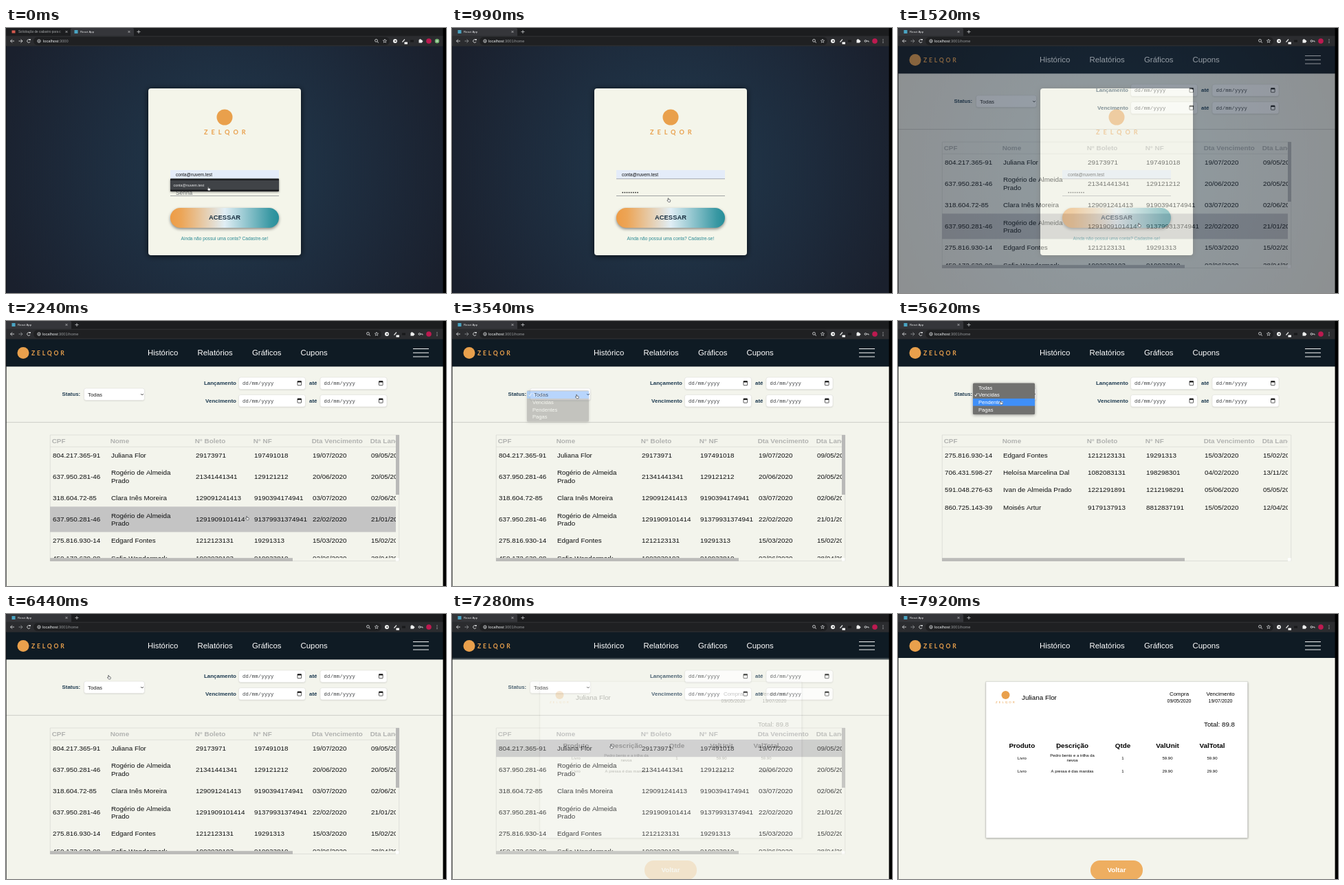
Recreate the animation shown at these times as an HTML page with a canvas. Size 640x386 px, loop 8000 ms.

```html
<!DOCTYPE html>
<html lang="pt">
<head>
<meta charset="utf-8">
<title>Painel de boletos</title>
<style>
html, body { margin: 0; width: 100%; height: 100%; overflow: hidden; background: #000; }
canvas { display: block; width: 640px; height: 386px; }
</style>
</head>
<body>
<canvas id="stage" width="640" height="386"></canvas>
<script>
const W = 640, H = 386, LOOP = 8000;
const SANS = '"Liberation Sans", Arial, sans-serif';
const MONO = '"Liberation Mono", monospace';
const CREAM = '#f3f4ec', ORANGE = '#e9a04c', NAVY = '#1d3a50';
const BRAND = 'ZELQOR', MAIL = 'conta@nuvem.test';

const stage = document.getElementById('stage').getContext('2d');
const layerCanvas = document.createElement('canvas');
layerCanvas.width = W;
layerCanvas.height = H;
const layer = layerCanvas.getContext('2d');
let g = stage;

const clamp = v => Math.max(0, Math.min(1, v));
const ramp = (t, a, b) => clamp((t - a) / (b - a));
const ease = p => p * p * (3 - 2 * p);

function rect(x, y, w, h, fill) {
  g.fillStyle = fill;
  g.fillRect(x, y, w, h);
}
function box(x, y, w, h, r, fill, stroke) {
  g.beginPath();
  g.roundRect(x, y, w, h, r);
  if (fill) { g.fillStyle = fill; g.fill(); }
  if (stroke) { g.strokeStyle = stroke; g.lineWidth = 0.7; g.stroke(); }
}
function dot(x, y, r, fill) {
  g.beginPath();
  g.arc(x, y, r, 0, 7);
  g.fillStyle = fill;
  g.fill();
}
function ring(x, y, r, color, from = 0, to = 7) {
  g.beginPath();
  g.arc(x, y, r, from, to);
  g.strokeStyle = color;
  g.lineWidth = 0.9;
  g.stroke();
}
function line(color, width, ...pts) {
  g.beginPath();
  for (let i = 0; i < pts.length; i += 2) g.lineTo(pts[i], pts[i + 1]);
  g.strokeStyle = color;
  g.lineWidth = width;
  g.stroke();
}
function text(s, x, y, size, color = '#0f1011', { align = 'left', bold = false, font = SANS, gap = 0 } = {}) {
  g.font = `${bold ? 'bold ' : ''}${size}px ${font}`;
  g.letterSpacing = gap + 'px';
  g.textAlign = align;
  g.fillStyle = color;
  g.fillText(s, x, y);
  g.letterSpacing = '0px';
}
function shadowed(color, blur, dy, draw) {
  g.shadowColor = color;
  g.shadowBlur = blur;
  g.shadowOffsetY = dy;
  draw();
  g.shadowColor = 'transparent';
  g.shadowBlur = g.shadowOffsetY = 0;
}
function clipped(x, y, w, h, draw) {
  g.save();
  g.beginPath();
  g.rect(x, y, w, h);
  g.clip();
  draw();
  g.restore();
}
// Draws a whole group with one opacity
function blend(alpha, draw) {
  if (alpha <= 0) return;
  g = layer;
  g.clearRect(0, 0, W, H);
  draw();
  g = stage;
  g.globalAlpha = alpha;
  g.drawImage(layerCanvas, 0, 0);
  g.globalAlpha = 1;
}
function brand(x, y, size, gap, bold = true) {
  text(BRAND, x, y, size, ORANGE, { font: 'Lato, sans-serif', gap, bold });
}

// Browser bar

function closeMark(x) {
  line('#c4c6c8', 0.7, x - 1.5, 4, x + 1.5, 7);
  line('#c4c6c8', 0.7, x + 1.5, 4, x - 1.5, 7);
}
function star(x, y) {
  g.beginPath();
  for (let i = 0; i < 10; i++) {
    const a = i * Math.PI / 5 - Math.PI / 2, r = i % 2 ? 1.2 : 2.8;
    g.lineTo(x + r * Math.cos(a), y + r * Math.sin(a));
  }
  g.closePath();
  g.strokeStyle = '#d0d2d4';
  g.lineWidth = 0.7;
  g.stroke();
}
function browser(home) {
  rect(0, 0, W, 12, '#1c1d1f');
  if (!home) {
    rect(8.5, 3.5, 5, 4, '#d65a4e');
    text('Solicitação de cadastro para c', 18, 7.2, 4.6, '#a9abad');
    closeMark(88);
  }
  const left = home ? 0 : 91;
  box(home ? 0 : 94, 0, home ? 95 : 92, 14, 2, '#35363a');
  rect(8.5 + left, 3, 5, 5, '#4aa5c4');
  text('React App', 17 + left, 7.2, 4.3, '#e6e7e8');
  closeMark(88 + left);
  const plus = home ? 103 : 193;
  line('#c4c6c8', 0.8, plus - 2.5, 5.5, plus + 2.5, 5.5);
  line('#c4c6c8', 0.8, plus, 3, plus, 8);
  rect(0, 11.5, W, 15, '#2b2c2f');
  box(40, 13, home ? 506 : 518, 12, 6, '#1f2022');

  const ink = '#d5d7d9', dim = '#8d9093';
  line(ink, 0.9, 12, 19, 6.5, 19);
  line(ink, 0.9, 9, 16.5, 6.5, 19, 9, 21.5);
  line(home ? dim : ink, 0.9, 18.5, 19, 24, 19);
  line(home ? dim : ink, 0.9, 21.5, 16.5, 24, 19, 21.5, 21.5);
  ring(33, 19, 2.3, ink, 0.4, 5.5);
  rect(33.8, 16, 2, 2, ink);
  ring(48, 19, 2.2, ink);
  rect(47.6, 18.2, 0.9, 2.2, ink);
  const x = home ? 53 : 54;
  text('localhost', x, 21, 5.7, '#eef0f1');
  text(home ? ':3001/home' : ':3000', x + g.measureText('localhost').width, 21, 5.7, '#96999c');

  const o = home ? -12 : 0;
  ring(538.5 + o, 18.3, 1.9, ink);
  line(ink, 0.9, 540 + o, 19.8, 542 + o, 21.6);
  star(551 + o, 19);
  dot(566 + o, 19, 3, '#f0f1f1');
  rect(565.5 + o, 18.2, 2, 1.6, '#333');
  line('#e4e5e6', 1.2, 576.5 + o, 20.5, 580 + o, 16.5);
  rect(579.5 + o, 20.5, 4.5, 3, '#fff');
  rect(588 + o, 17.5, 5, 3, '#18191b');
  rect(600.5 + o, 17.2, 4.6, 4.4, '#f0f1f1');
  dot(602.5 + o, 17, 1.1, '#f0f1f1');
  dot(605.3 + o, 19.4, 1.1, '#f0f1f1');
  if (home) {
    ring(601.5, 19, 1.4, ink);
    line(ink, 0.9, 603, 19, 606, 19, 606, 20.5);
    for (const y of [16.8, 19, 21.2]) dot(627, y, 0.6, ink);
  } else {
    dot(627, 19, 3.2, '#79b877');
    dot(627, 19, 1.1, '#e3f1e0');
  }
  dot(615, 19, 3.8, '#bd1a50');
}

// Login page

function login(t) {
  const bg = g.createRadialGradient(318, 206, 60, 318, 206, 350);
  bg.addColorStop(0, '#20364a');
  bg.addColorStop(0.55, '#1d2a3b');
  bg.addColorStop(1, '#1a202d');
  rect(0, 0, W, H, bg);
  shadowed('rgba(0,0,0,.75)', 9, 1, () => box(207, 88, 222, 243, 4, '#f4f5ea'));
  dot(318, 130, 11.5, ORANGE);
  brand(288, 154.5, 9.2, 4.9);

  rect(239, 207, 158, 13, '#e4ecf9');
  line('#8b8f92', 0.7, 239, 219.7, 397, 219.7);
  text(MAIL, 247, 215.6, 6.35);
  line('#8b8f92', 0.8, 239, 244.5, 397, 244.5);
  const typed = Math.floor(8 * ramp(t, 420, 950));
  if (typed) for (let i = 0; i < typed; i++) dot(248.3 + i * 3.1, 239.6, 0.9, '#222');
  else text('Senha', 247, 242.6, 8.4, '#6d7173');
  if (t < 300) {
    shadowed('rgba(0,0,0,.5)', 3, 1, () => box(239, 219.5, 158, 18.5, 1, '#1d1e21'));
    rect(239, 222, 158, 13.5, '#404347');
    text(MAIL, 243.5, 230.6, 5.35, '#e9eaeb');
  }

  const fill = g.createLinearGradient(239, 0, 397, 0);
  fill.addColorStop(0, '#ee9c45');
  fill.addColorStop(0.1, '#eca557');
  fill.addColorStop(0.5, '#e1eef5');
  fill.addColorStop(0.93, '#3797a2');
  fill.addColorStop(1, '#278f9a');
  shadowed('rgba(0,0,0,.45)', 4, 2, () => box(239, 262, 158, 29, 14.5, fill));
  text('ACESSAR', 318, 279.3, 9.4, '#1b3142', { align: 'center', bold: true });
  text('Ainda não possui uma conta? Cadastre-se!', 318, 308.8, 6.62, '#2b8a94', { align: 'center' });
}

// Home page

function row(cpf, name, bill, note, due, issued) {
  const lines = name.split('|');
  return { lines, cells: [cpf, null, bill, note, due, issued], h: lines.length > 1 ? 37 : 25.2 };
}
const flor = row('804.217.365-91', 'Juliana Flor', '29173971', '197491018', '19/07/2020', '09/05/2020');
const prado = row('637.950.281-46', 'Rogério de Almeida|Prado', '21341441341', '129121212', '20/06/2020', '20/05/2020');
const clara = row('318.604.72-85', 'Clara Inês Moreira', '129091241413', '9190394174941', '03/07/2020', '02/06/2020');
const prado2 = row('637.950.281-46', 'Rogério de Almeida|Prado', '1291909101414', '91379931374941', '22/02/2020', '21/01/2020');
const edgard = row('275.816.930-14', 'Edgard Fontes', '1212123131', '19291313', '15/03/2020', '15/02/2020');
const sofia = row('450.172.639-08', 'Sofia Wendermark', '1902039103', '919933810', '02/06/2020', '28/04/2020');
const helo = row('706.431.598-27', 'Heloísa Marcelina Dal', '1082083131', '198298301', '04/02/2020', '13/11/2019');
const ivan = row('591.048.276-63', 'Ivan de Almeida Prado', '1221291891', '1212198291', '05/06/2020', '05/05/2020');
const moises = row('860.725.143-39', 'Moisés Artur', '9179137913', '8812837191', '15/05/2020', '12/04/2020');

const LISTS = [
  [flor, prado, clara, prado2, edgard, sofia],
  [edgard, helo, ivan, moises],
  [flor, prado, clara]
];
const OPTIONS = ['Todas', 'Vencidas', 'Pendentes', 'Pagas'];
const HEADS = ['CPF', 'Nome', 'N° Boleto', 'N° NF', 'Dta Vencimento', 'Dta Lançamento'];
const COLS = [68, 153, 276, 361, 446, 531];

function nav(bottom) {
  rect(0, 26, W, bottom - 26, '#0f1b24');
  dot(25, 46.5, 8.5, ORANGE);
  brand(37, 49.8, 8.6, 2.8);
  text('Histórico', 206, 49.8, 11.4, '#fff');
  text('Relatórios', 278.5, 49.8, 11.4, '#fff');
  text('Gráficos', 358, 49.8, 11.4, '#fff');
  text('Cupons', 428.5, 49.8, 11.4, '#fff');
  for (const y of [40.5, 46.3, 52]) line('#f4f5f5', 1, 592, y, 615, y);
}
function field(x, y, w, h) {
  shadowed('rgba(0,0,0,.12)', 2, 1, () => box(x, y, w, h, 3, '#fff'));
  box(x, y, w, h, 3, null, '#e2e3de');
}
function dateField(x, y) {
  field(x, y, 97, 17.5);
  text('dd/mm/yyyy', x + 5.5, y + 11.1, 7.2, '#3b3e40', { font: MONO, gap: 0.25 });
  const ix = x + 85.5, iy = y + 5.5;
  box(ix, iy, 5.6, 6.2, 0.6, null, '#161616');
  rect(ix, iy, 5.6, 1.9, '#161616');
}
function filters(chosen) {
  const label = { bold: true };
  text('Status:', 81.5, 109.3, 7.9, NAVY, label);
  field(113.5, 98, 88, 17.5);
  text(OPTIONS[chosen], 119, 109.6, 7.9, '#222');
  line('#333', 0.9, 196.2, 106, 198, 107.9, 199.8, 106);
  [['Lançamento', 82], ['Vencimento', 107.5]].forEach(([name, y]) => {
    text(name, 335, y + 11.3, 8, NAVY, { bold: true, align: 'right' });
    dateField(338.5, y);
    text('até', 441, y + 11.3, 8, NAVY, label);
    dateField(457, y);
  });
  line('#c9cac5', 0.9, 0, 147.6, W, 147.6);
}
function table(rows, mouse) {
  box(64.3, 166, 507.4, 183.5, 0, null, '#d6d7d1');
  clipped(64, 166, 503, 179.3, () => {
    HEADS.forEach((h, i) => text(h, COLS[i] - 1.3, 178.2, 9.9, '#b1b2b0', { bold: true }));
    line('#dcddd7', 0.8, 64, 183.3, 567, 183.3);
    let y = 183;
    for (const r of rows) {
      if (mouse && mouse.y >= y && mouse.y < Math.min(y + r.h, 345) && mouse.x > 64 && mouse.x < 567)
        rect(64, y, 503, r.h, '#c4c4c4');
      const mid = y + r.h / 2 + 3.4;
      COLS.forEach((x, i) => {
        if (r.cells[i]) text(r.cells[i], x, mid, 9.9);
      });
      const top = mid - (r.lines.length - 1) * 5.7;
      r.lines.forEach((s, i) => text(s, COLS[1], top + i * 11.4, 9.85));
      y += r.h;
    }
  });
  if (rows.length > 5) rect(567, 166, 5, 87, '#b9b9b8');
  rect(64, 345.2, 353, 4.8, '#bbbbb9');
  rect(567, 345.2, 4.5, 4.5, '#fff');
}
function popup(selected, hover) {
  const step = 10.7, first = 107.6 - selected * step, top = first - 6.4;
  const check = first + selected * step;
  shadowed('rgba(0,0,0,.4)', 4, 1, () => box(109, top, 90, 45.4, 1.5, '#71716f'));
  rect(109, first + hover * step - step / 2, 90, step, '#3f8ff8');
  OPTIONS.forEach((s, i) => text(s, 117, first + i * step + 2.7, 7.6, '#fff'));
  line('#fff', 0.9, 111.6, check, 113, check + 2, 115.4, check - 2.4);
}

// Each opening of the list: shown from, picked at, selected before, picked option
const MENUS = [
  { from: 3510, pick: 4030, before: 0, after: 1 },
  { from: 5160, pick: 5740, before: 1, after: 2 },
  { from: 5960, pick: 6270, before: 2, after: 0 }
];
const FADE = 85;
const openMenu = t => MENUS.find(m => t >= m.from && t < m.pick + FADE);

function home(t, mouse) {
  rect(0, 26, W, H, CREAM);
  let chosen = 0, shown = 0;
  for (const m of MENUS) {
    if (t >= m.pick) chosen = m.after;
    if (t >= m.pick + FADE) shown = m.after;
  }
  nav(66.4);
  filters(chosen);
  table(LISTS[shown], openMenu(t) ? null : mouse);
  browser(true);
}
function menu(t, mouse) {
  const m = openMenu(t);
  if (!m) return;
  const alpha = ramp(t, m.from, m.from + FADE) * (1 - ramp(t, m.pick, m.pick + FADE));
  const over = Math.round((mouse.y - 107.6) / 10.7 + m.before);
  const hover = t > m.pick ? m.after : Math.max(0, Math.min(3, over));
  blend(alpha, () => popup(m.before, hover));
}

// Detail page

function detail() {
  rect(0, 26, W, H, CREAM);
  nav(64);
  shadowed('rgba(0,0,0,.4)', 2.5, 1, () => rect(128, 98.5, 380.5, 227.5, '#fff'));
  box(127.8, 98.3, 381, 228, 0, null, '#cfd0cb');
  dot(156.5, 118, 6, ORANGE);
  brand(142, 129.6, 4.3, 2.2, false);
  const mid = { align: 'center' };
  text('Juliana Flor', 180, 125.4, 9.85, '#000');
  text('Compra', 409, 118.6, 7.9, '#000', mid);
  text('Vencimento', 469, 118.6, 7.9, '#000', mid);
  text('09/05/2020', 409, 129.4, 7, '#000', mid);
  text('19/07/2020', 469, 129.4, 7, '#000', mid);
  text('Total: 89.8', 490, 164.4, 9.75, '#000', { align: 'right' });
  const xs = [180.3, 253.5, 327, 392, 457];
  ['Produto', 'Descrição', 'Qtde', 'ValUnit', 'ValTotal'].forEach((s, i) =>
    text(s, xs[i], 195.3, 9.85, '#000', { align: 'center', bold: true }));
  [[211.6, 'Pedro bento e a trilha da|nevoa', '59.90'], [231.4, 'A pressa é das marolas', '29.90']].forEach(([y, name, price]) => {
    const parts = name.split('|');
    parts.forEach((s, i) => text(s, xs[1], y + (i - (parts.length - 1) / 2) * 6.8, 5.9, '#000', mid));
    ['Livro', null, '1', price, price].forEach((s, i) => {
      if (s) text(s, xs[i], y, 6, '#000', mid);
    });
  });
  box(280, 359, 76, 28, 13.5, '#eeae60');
  text('Voltar', 318, 376, 9.8, '#fff', { align: 'center', bold: true });
  browser(true);
}

// Mouse

const PATH = [
  [0, 295, 234], [260, 295, 232], [900, 310, 245], [1300, 351, 287], [2450, 351, 287],
  [3250, 182, 110], [3620, 182, 110], [3900, 150, 118], [4300, 150, 118], [4850, 152, 109],
  [5250, 152, 109], [5480, 150, 119], [5850, 150, 119], [6000, 150, 108], [6180, 150, 92],
  [6600, 150, 92], [7080, 232, 193], [8000, 232, 193]
];
function mouseAt(t) {
  let i = 0;
  while (i < PATH.length - 2 && t >= PATH[i + 1][0]) i++;
  const [t0, x0, y0] = PATH[i], [t1, x1, y1] = PATH[i + 1];
  const p = ease(ramp(t, t0, t1));
  return { x: x0 + (x1 - x0) * p, y: y0 + (y1 - y0) * p };
}
function hand({ x, y }) {
  g.save();
  g.translate(x, y);
  g.scale(0.8, 0.8);
  g.beginPath();
  [-1.6, -3.2, -0.5, -3.2, -0.2, -0.8, 2.4, -0.3, 3, 1, 2.2, 3.6, -0.9, 3.6, -3.2, 0.6, -1.6, 0.6]
    .forEach((v, i, a) => { if (i % 2) g.lineTo(a[i - 1], v); });
  g.closePath();
  g.fillStyle = '#fff';
  g.fill();
  g.strokeStyle = '#45484a';
  g.lineWidth = 0.9;
  g.stroke();
  g.restore();
}
function beam({ x, y }) {
  line('#333', 0.8, x, y - 3.5, x, y + 3.5);
  line('#333', 0.7, x - 1.4, y - 3.8, x + 1.4, y - 3.8);
  line('#333', 0.7, x - 1.4, y + 3.8, x + 1.4, y + 3.8);
}

function draw(t) {
  const mouse = mouseAt(t);
  const toHome = ramp(t, 1410, 1620), toDetail = ramp(t, 7240, 7420);
  if (toHome < 1) {
    login(t);
    browser(t >= 800);
  }
  if (toDetail < 1) blend(toHome, () => home(t, mouse));
  menu(t, mouse);
  blend(toDetail, detail);
  (toDetail > 0.5 ? beam : hand)(mouse);
  rect(635.6, 0, 5, H, '#000');
  rect(0, 26, 0.6, H, '#0a0d10');
}

function tick() {
  draw(performance.now() % LOOP);
  requestAnimationFrame(tick);
}
tick();
</script>
</body>
</html>
```
